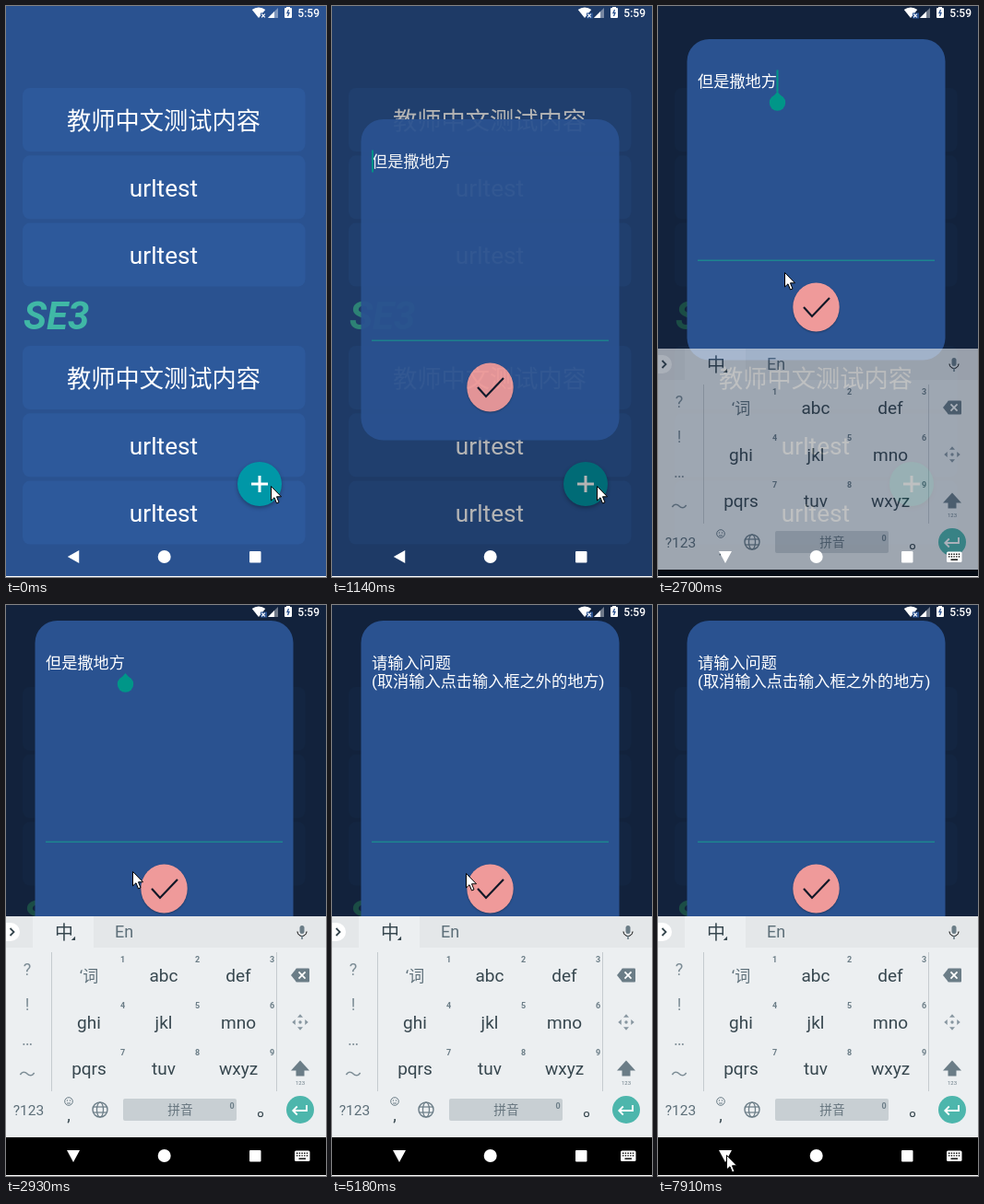
An HTML page with a canvas that plays this animation: 347 by 620 pixels, repeating every 8 s.

```html
<!DOCTYPE html>
<html lang="zh">
<head>
<meta charset="utf-8">
<style>
html, body { margin: 0; width: 100%; height: 100%; overflow: hidden; background: #2a5290; }
canvas { display: block; }
</style>
</head>
<body>
<canvas id="stage" width="347" height="620"></canvas>
<script>
const LOOP = 8000, W = 347, H = 620;
const FONT = 'Roboto, "Noto Sans CJK SC", "Noto Sans CJK", sans-serif';
const BLUE = '#2a5290', TEAL = '#009688', WHITE = '#fff';
const INK = '#37474f', SOFT = '#5d6f79', GREY = '#6b7d87', RULE = '#c5cbcf';

const stage = document.getElementById('stage');
const sheet = Object.assign(document.createElement('canvas'), { width: W, height: H });
let ctx = stage.getContext('2d');

const progress = (t, from, to) => Math.max(0, Math.min(1, (t - from) / (to - from)));
const easeOut = (p, power) => 1 - (1 - p) ** power;

// Drawing helpers
function text(str, x, y, size, color, align = 'center', style = '') {
  ctx.font = `${style} ${size}px ${FONT}`;
  ctx.textAlign = align;
  ctx.fillStyle = color;
  ctx.fillText(str, x, y);
}
function box(x, y, w, h, color, radius = 0) {
  ctx.fillStyle = color;
  ctx.beginPath();
  ctx.roundRect(x, y, w, h, radius);
  ctx.fill();
}
function oval(x, y, rx, color, ry = rx) {
  ctx.fillStyle = color;
  ctx.beginPath();
  ctx.ellipse(x, y, rx, ry, 0, 0, 7);
  ctx.fill();
}
function ring(x, y, rx, color, width, ry = rx) {
  ctx.beginPath();
  ctx.ellipse(x, y, rx, ry, 0, 0, 7);
  ctx.strokeStyle = color;
  ctx.lineWidth = width;
  ctx.stroke();
}
function line(color, width, ...points) {
  ctx.beginPath();
  for (let i = 0; i < points.length; i += 2) ctx.lineTo(points[i], points[i + 1]);
  ctx.strokeStyle = color;
  ctx.lineWidth = width;
  ctx.stroke();
}
// Runs draw around (x, y), turned by quarter turns
function at(x, y, turns, draw) {
  ctx.save();
  ctx.translate(x, y);
  ctx.rotate(turns * Math.PI / 2);
  draw();
  ctx.restore();
}
function triangle(x, y, w, h, turns, color) {
  at(x, y, turns, () => {
    ctx.beginPath();
    ctx.moveTo(0, -h / 2);
    ctx.lineTo(w / 2, h / 2);
    ctx.lineTo(-w / 2, h / 2);
    ctx.fillStyle = color;
    ctx.fill();
  });
}
function chevron(x, y, r, turns, color, width = 1.8) {
  at(x, y, turns, () => line(color, width, -r, r / 2, 0, -r / 2, r, r / 2));
}
function plus(x, y, r, turns, color, width) {
  at(x, y, turns, () => {
    line(color, width, -r, 0, r, 0);
    line(color, width, 0, -r, 0, r);
  });
}
function shadow(blur, dy, draw) {
  ctx.save();
  ctx.shadowColor = 'rgba(0,0,0,.3)';
  ctx.shadowBlur = blur;
  ctx.shadowOffsetY = dy;
  draw();
  ctx.restore();
}
// Draws a group on its own sheet, then blends it in as a whole
function group(alpha, dy, draw) {
  if (!alpha) return;
  const below = ctx;
  ctx = sheet.getContext('2d');
  ctx.clearRect(0, 0, W, H);
  at(0, dy, 0, draw);
  ctx = below;
  ctx.globalAlpha = alpha;
  ctx.drawImage(sheet, 0, 0);
  ctx.globalAlpha = 1;
}

function drawPage(t) {
  box(0, 0, W, H, BLUE);
  for (const top of [89, 369]) {
    for (let i = 0; i < 3; i++) {
      const y = top + i * 73.3;
      box(18, y, 306.5, 69, '#2d599b', 8);
      text(i ? 'urltest' : '教师中文测试内容', 171, Math.floor(y) + 45, 26.25, WHITE);
    }
  }
  text('SE3', 19, 351, 42, '#40b8a6', 'left', 'italic bold');

  shadow(4, 2, () => oval(275, 519, 24, '#0097a7'));
  const fade = 1 - progress(t, 800, 1100);
  oval(275, 519, 24 * progress(t, 580, 800), `rgba(255,255,255,${.25 * fade})`);
  plus(275, 519, 9, 0, WHITE, 3);

  box(0, 0, W, H, `rgba(0,0,0,${.58 * progress(t, 1050, 1230)})`);
}

function drawStatus() {
  ctx.fillStyle = WHITE;
  ctx.beginPath();
  ctx.moveTo(274, 13);
  ctx.arc(274, 13, 11.5, -2.25, -.89);
  ctx.fill();
  box(276, 7.5, 7, 6, BLUE);
  plus(279, 10.5, 2.6, .5, WHITE, 1.2);
  for (const [size, color] of [[11, 'rgba(255,255,255,.4)'], [7, WHITE]]) {
    ctx.fillStyle = color;
    ctx.beginPath();
    ctx.moveTo(284, 13);
    ctx.lineTo(284 + size, 13);
    ctx.lineTo(284 + size, 13 - size);
    ctx.fill();
  }
  box(302, 2, 8, 11, WHITE, 1);
  box(304, 1, 4, 2, WHITE);
  line(BLUE, 1.3, 306.5, 4, 305, 7.5, 307, 7.5, 305.5, 11);
  text('5:59', 340, 11.5, 12, WHITE, 'right', '500');
}

function drawDialog(t) {
  const cleared = t >= 4170;
  const atEnd = t >= 2230 && !cleared;
  const blink = t < 2230 ? t < 1650 || t >= 2000 : (t - 2230) % 1030 < 530;
  const lines = cleared ? ['请输入问题', '(取消输入点击输入框之外的地方)'] : ['但是撒地方'];
  const alpha = easeOut(progress(t, 1050, 1170), 2);
  const y = 123 - 106 * easeOut(progress(t, 2550, 2900), 3);
  group(alpha, Math.round(y), () => {
    box(31.5, 0, 280, 348.5, BLUE, 24);
    lines.forEach((str, i) => text(str, 43, 51.5 + i * 20, 17.2, WHITE, 'left'));
    if (blink) box(atEnd ? 128.5 : 43, 33.5, 2, 24, TEAL);
    if (atEnd) {
      oval(129.5, 69, 8.7, TEAL);
      triangle(129.5, 61, 14, 8, 0, TEAL);
    }
    box(43, 239.5, 257, 1.6, '#1d8590');
    shadow(2, 1, () => oval(171.5, 291, 25.2, '#ef9a9a', 26.5));
    line('#111827', 2.2, 158, 291, 167, 301, 186, 281);
  });
}

function drawCandidates(composing) {
  const words = composing === 't' ? '他她它天图听' : ['提啊', ...'提体题踢替'];
  box(0, 320, 21, 18, '#dfe3e6', [0, 3, 0, 0]);
  text(composing, 5, 334, 14, '#263238', 'left');
  [...words].forEach((word, i) => {
    text(word, 23 + i * 51.4, 362, 18, i ? '#62757f' : '#1c262b');
    box(49 + i * 51.2, 345, 1, 21, RULE);
  });
  chevron(326, 355, 4.5, 2, GREY);
}

function drawToolbar() {
  box(29, 338, 66, 34, '#eceff1');
  box(-10, 345, 25, 20, WHITE, 10);
  chevron(6.5, 355, 4, 1, INK);
  text('中', 63, 362.5, 20, INK);
  triangle(74, 363, 6, 3, 1.5, INK);
  text('En', 128, 361, 18, SOFT);
  box(318.5, 348, 5, 9, GREY, 2.5);
  ctx.beginPath();
  ctx.arc(321, 354.5, 5, 0, Math.PI);
  ctx.stroke();
  box(320.2, 359, 1.6, 4, GREY);
}

function drawKeys(composing) {
  const labels = ['‘词', 'abc', 'def', 'ghi', 'jkl', 'mno', 'pqrs', 'tuv', 'wxyz'];
  labels.forEach((label, i) => {
    const x = 90 + i % 3 * 81, y = 409 + Math.floor(i / 3) * 50.5;
    text(label, x, y, i ? 19 : 17, i ? INK : SOFT);
    text(i + 1, x + 36.5, y - 21.5, 9, GREY, 'center', 'bold');
  });
  for (const x of [49, 293]) box(x, 377, 1, 151, RULE);

  const side = composing === 't' ? ['t', 'u', 'v'] : composing ? ['ti', 't'] : [...'?!…～'];
  side.forEach((str, i) => text(str, 23, 402 + i * 38, composing ? 14.5 : 18, '#7d8d96'));
  if (composing) {
    text('清除', 319, 458, 15.5, SOFT);
  } else {
    oval(319, 453, 1.7, '#8796a0');
    for (let i = 0; i < 4; i++) {
      at(319, 453, i, () => triangle(0, -7, 6, 3.5, 0, '#8796a0'));
    }
  }

  // Backspace, shift and enter
  triangle(312, 402, 15, 6, 3, GREY);
  box(314.5, 394.5, 14.5, 15, GREY, 1);
  plus(321, 402, 5, .5, WHITE, 1.7);
  triangle(319, 500, 20, 11, 0, GREY);
  box(314.5, 505, 9, 6.5, GREY);
  text('123', 319, 521, 6, GREY);
  oval(319, 548, 15, '#4db6ac');
  line(WHITE, 1.9, 326, 543, 326, 549, 312, 549);
  chevron(313.5, 549, 4.5, 3, WHITE);

  // Bottom row
  text('?123', 24.5, 553.5, 15.5, SOFT);
  ring(68, 539, 4.3, GREY, 1);
  for (const x of [66.5, 69.5]) oval(x, 538, .7, GREY);
  box(66, 540.5, 4, 1, GREY);
  text(',', 68, 560, 18, INK);
  ring(102, 548, 8, GREY, 1.4);
  ring(102, 548, 3.5, GREY, 1.2, 8);
  for (const y of [545, 551]) box(94.5, y - .6, 15, 1.2, GREY);
  box(127, 536, 123, 24, '#c8cfd3', 2);
  text('拼音', 189, 553.3, 13.7, '#66757e');
  text('0', 245, 547, 9, GREY, 'center', 'bold');
  ring(276, 553, 2.5, INK, 1.2);
}

function drawKeyboard(t) {
  const shown = easeOut(progress(t, 2620, 2860), 2.5);
  const composing = t < 3160 || t >= 4170 ? '' : t < 3710 ? 't' : 'ti';
  group(shown, Math.round(96 * (1 - shown)), () => {
    box(0, 338, W, 34, '#e4e7e9');
    box(0, 372, W, 206, '#eceff1');
    box(0, 578, W, 42, '#000');
    if (composing) drawCandidates(composing);
    else drawToolbar();
    drawKeys(composing);
  });
}

function drawNavigation(t) {
  if (t < 2620) {
    triangle(73, 598, 14, 12.5, 3, WHITE);
  } else {
    triangle(73, 598.5, 14, 13, 2, WHITE);
    box(313, 592.5, 16.5, 11.5, WHITE, 1.5);
    for (let i = 0; i < 10; i++) {
      box(315 + i % 5 * 2.7, 594.5 + Math.floor(i / 5) * 2.7, 1.4, 1.4, '#000');
    }
    box(317.5, 600.5, 7.5, 1.4, '#000');
  }
  oval(171.7, 598, 7, WHITE);
  box(264, 592, 12.5, 12.5, WHITE, 1);
  box(0, 619, W, 1, WHITE);
}

function drawPointer(t) {
  const toDialog = progress(t, 1320, 1730);
  const toEdge = progress(t, 5150, 5960);
  const toBack = progress(t, 6850, 7740);
  const x = 288 - 150 * toDialog + 196 * toEdge - 259 * toBack;
  const dip = 30 * Math.sin(Math.PI * toEdge ** 2);
  const y = 521 - 232 * toDialog + 41 * toEdge + dip + 267 * toBack;
  at(Math.round(x) - .5, Math.round(y) + .5, 0, () => {
    const outline = new Path2D('M0 0V15.5L3.5 12.3L6 18.5L8.5 17.5L6 11.3H11Z');
    ctx.fillStyle = WHITE;
    ctx.fill(outline);
    ctx.strokeStyle = '#000';
    ctx.lineWidth = 1;
    ctx.stroke(outline);
  });
}

function frame(now) {
  const t = now % LOOP;
  drawPage(t);
  drawDialog(t);
  drawStatus();
  drawKeyboard(t);
  drawNavigation(t);
  drawPointer(t);
  requestAnimationFrame(frame);
}
requestAnimationFrame(frame);
</script>
</body>
</html>
```
